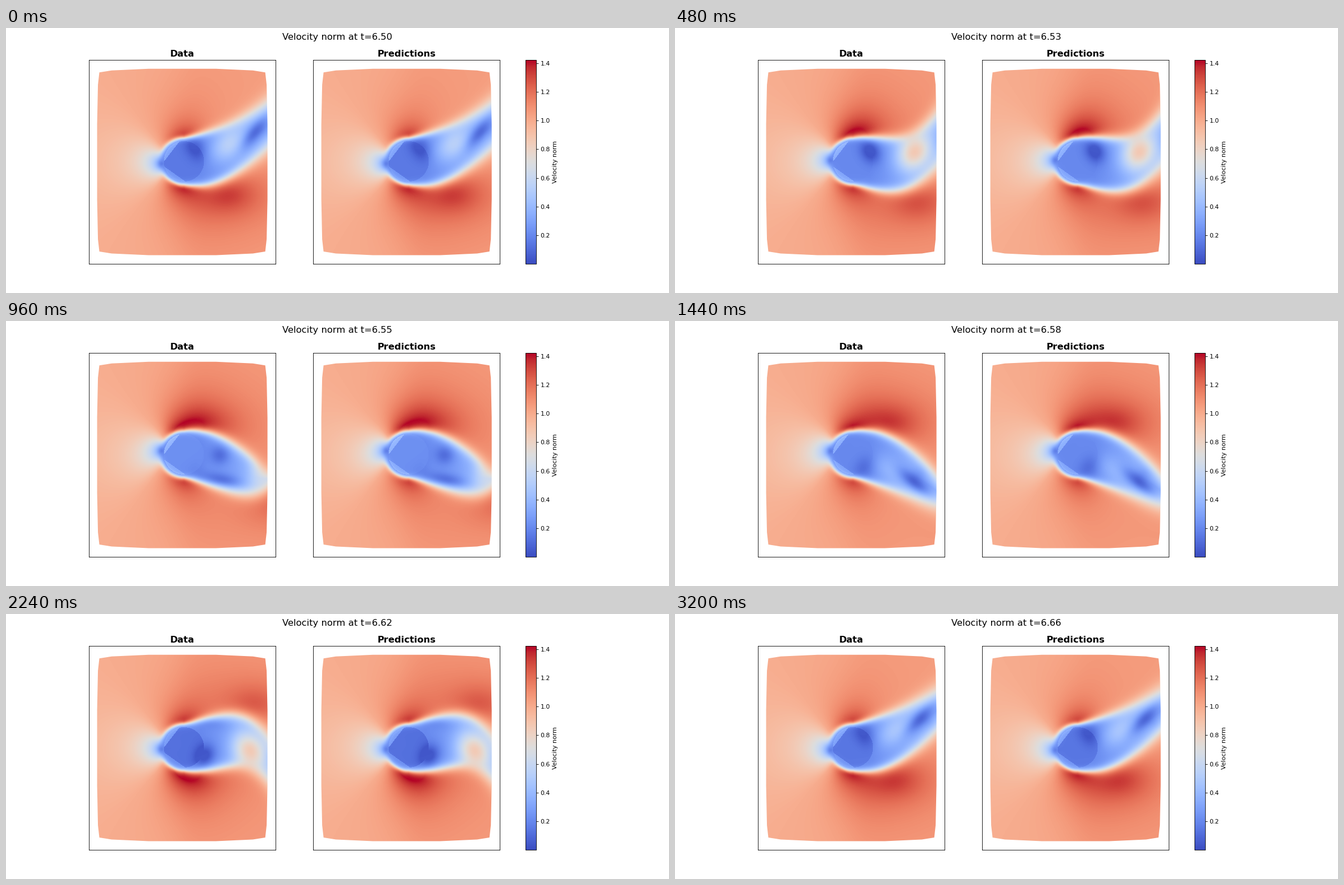
A matplotlib script that plays this animation: 1183x473 px, repeating every 3360 ms.

```python
import numpy as np
import matplotlib.pyplot as plt
from matplotlib.animation import FuncAnimation
from matplotlib.patches import Polygon

W, H, DPI = 1183, 473, 64
K = W / 15 / DPI            # point scale of a 15 inch wide layout
FRAMES, INTERVAL = 21, 160
PERIOD = 20.5               # vortex shedding period in frames
OMEGA = 2 * np.pi / PERIOD
CX, CY, R = 318, 238.5, 38  # cylinder in stage pixels
WAKE = 149                  # distance from cylinder to outflow
VMAX = 1.42

plt.rcParams.update({
    "font.family": "DejaVu Sans", "font.size": 10 * K,
    "axes.linewidth": 0.8 * K, "axes.titlepad": 6 * K, "axes.labelpad": 4 * K,
    "ytick.major.size": 3.5 * K, "ytick.major.width": 0.8 * K,
    "ytick.major.pad": 3.5 * K,
})

px = np.arange(160, 471)
py = np.arange(70, 409)
x, y = np.meshgrid(px - CX, CY - py)
r = np.hypot(x, y)


def logistic(v):
    return 1 / (1 + np.exp(-v))


def bump(p, peak, width):
    return np.exp(-((p - peak) / width) ** 2)


def centre(d, t):
    """Height of the wake's middle line: a growing wave travelling right."""
    q = np.maximum(d, 0) / WAKE
    wave = np.cos(OMEGA * (t + 3.8 - 3 * q ** 1.5))
    return 65 * q ** 1.75 * np.tanh(1.4 * wave) / np.tanh(1.4)


def half_width(d, t):
    q = np.maximum(d, 0) / WAKE
    return 42 + 28 * q - 40 * q ** 2 + 20 * q ** 4 * np.cos(2 * OMEGA * (t - 1.8))


def blob(up, d, height, along, across, angle, amp):
    a = np.radians(angle)
    dx, dy = x - d, up - height
    u = dx * np.cos(a) + dy * np.sin(a)
    v = dy * np.cos(a) - dx * np.sin(a)
    return amp * np.exp(-0.5 * ((u / along) ** 2 + (v / across) ** 2))


def eddies(t, up):
    """Light eddy, dark crescent and dark core shed by one side."""
    p = (t + 7) % PERIOD - 7

    d = 79 + 10.4 * p
    amp = 0.55 * bump(p, 3.2, 3.7)
    light = blob(up, d, centre(d, p) + 12, 25, 15 + 10 * amp, 42 + 4 * p, amp)

    d = 126 + 13 * p
    crescent = blob(up, d, centre(d, p) + 5 - 6 * p, 25, 9, 52 + 10 * p,
                    -0.27 * bump(p, -1.5, 4.5))

    drift = max(p, 0) ** 2
    core = blob(up, 20 + 1.25 * drift, 24 - 0.7 * drift, 18 - max(p, 0), 12, 120,
                -0.22 * bump(p, 3, 4.8))
    return light + crescent + core


def fast_lobe(t, up):
    """Accelerated flow riding over one side of the wake."""
    p = t % PERIOD
    d = 4 * p + 0.35 * p ** 2
    height = 48 + 0.01 * p ** 3
    amp = 0.33 * np.sin(np.pi * (p / PERIOD) ** 0.7)
    return amp / (1 + ((x - d) / 60) ** 2 + ((up - height) / 40) ** 2)


def outer_flow(t):
    # Potential flow past the cylinder with a swaying stagnation point
    sway = 6.5 * np.cos(OMEGA * (t - 7.25))
    ys = y - sway * np.exp(-((x + 42) / 35) ** 2)
    rr = x ** 2 + ys ** 2
    a = R ** 2 / np.maximum(rr, R ** 2)
    cos2 = (x ** 2 - ys ** 2) / np.maximum(rr, 1)
    gain = np.sqrt(np.maximum(1 - 2 * a * cos2 + a ** 2, 0)) - 1

    front = np.where(gain > 0, 0.55 * gain, gain)
    rear = 0.55 * 0.05 * np.logaddexp(0, gain / 0.05)
    behind = logistic((x - 5) / 8)
    lobes = fast_lobe(t, y) + fast_lobe(t + PERIOD / 2, -y)
    flow = 0.99 + front * (1 - behind) + rear * behind
    flow += logistic((x + 12) / 18) * (0.03 + lobes)
    return np.minimum(flow, VMAX)


def inner_flow(t):
    # Slow wake, with the cylinder filled in by flat facets
    flow = 0.21 + 0.1 * np.clip((x - 30) / 70, 0, 1)
    body = 0.17 + 0.06 * np.cos(OMEGA * (t - 6))
    solid = r < 36
    flow[solid] = body
    flow[solid & (0.61 * y - 0.79 * x > 28)] = body + 0.15
    flow[solid & (-0.82 * y - 0.58 * x > 28)] = body + 0.1
    flow += eddies(t, y) + eddies(t + PERIOD / 2, -y)
    return np.maximum(flow, 0.04)


def velocity(t):
    mid = centre(x, t)
    tilt = np.hypot(1, np.gradient(mid, axis=1))
    edge = (np.abs(y - mid) - half_width(x, t)) / tilt
    dist = np.where(x < 0, r - 42, edge)
    blur = 5 + 0.08 * np.maximum(x, 0)
    share = 0.5 * (1 + np.tanh(dist / blur))
    return inner_flow(t) * (1 - share) + outer_flow(t) * share


fields = [velocity(i) for i in range(FRAMES)]

# One quarter of the mesh outline, mirrored into all four corners
corner = np.array([(60, 166.5), (126, 163.5), (148, 160), (150.5, 138), (152, 67)])
outline = np.vstack([corner, corner[::-1] * (1, -1),
                     corner * (-1, -1), corner[::-1] * (-1, 1)])
outline = outline * (1, -1) + (314.6, 239)

fig, axes = plt.subplots(1, 2, figsize=(W / DPI, H / DPI), dpi=DPI)
fig.subplots_adjust(top=0.8785)
images = []
for ax, name in zip(axes, ("Data", "Predictions")):
    im = ax.imshow(fields[0], cmap="coolwarm", vmin=0.002, vmax=VMAX,
                   extent=(px[0] - 0.5, px[-1] + 0.5, py[-1] + 0.5, py[0] - 0.5),
                   interpolation="bilinear", aspect="auto")
    ax.set(xlim=(147.9, 481.3), ylim=(421, 57.2), xticks=[], yticks=[])
    im.set_clip_path(Polygon(outline, transform=ax.transData))
    ax.set_title(name, fontsize=15 * K, fontweight="bold")
    images.append(im)
fig.colorbar(images[0], ax=axes, label="Velocity norm", aspect=19.3,
             ticks=np.arange(1, 8) * 0.2)
heading = fig.suptitle("", fontsize=15 * K)


def update(i):
    for im in images:
        im.set_data(fields[i])
    heading.set_text(f"Velocity norm at t={6.504 + 0.008 * i:.2f}")
    return [*images, heading]


anim = FuncAnimation(fig, update, frames=FRAMES, interval=INTERVAL, repeat=True)
plt.show()
```
